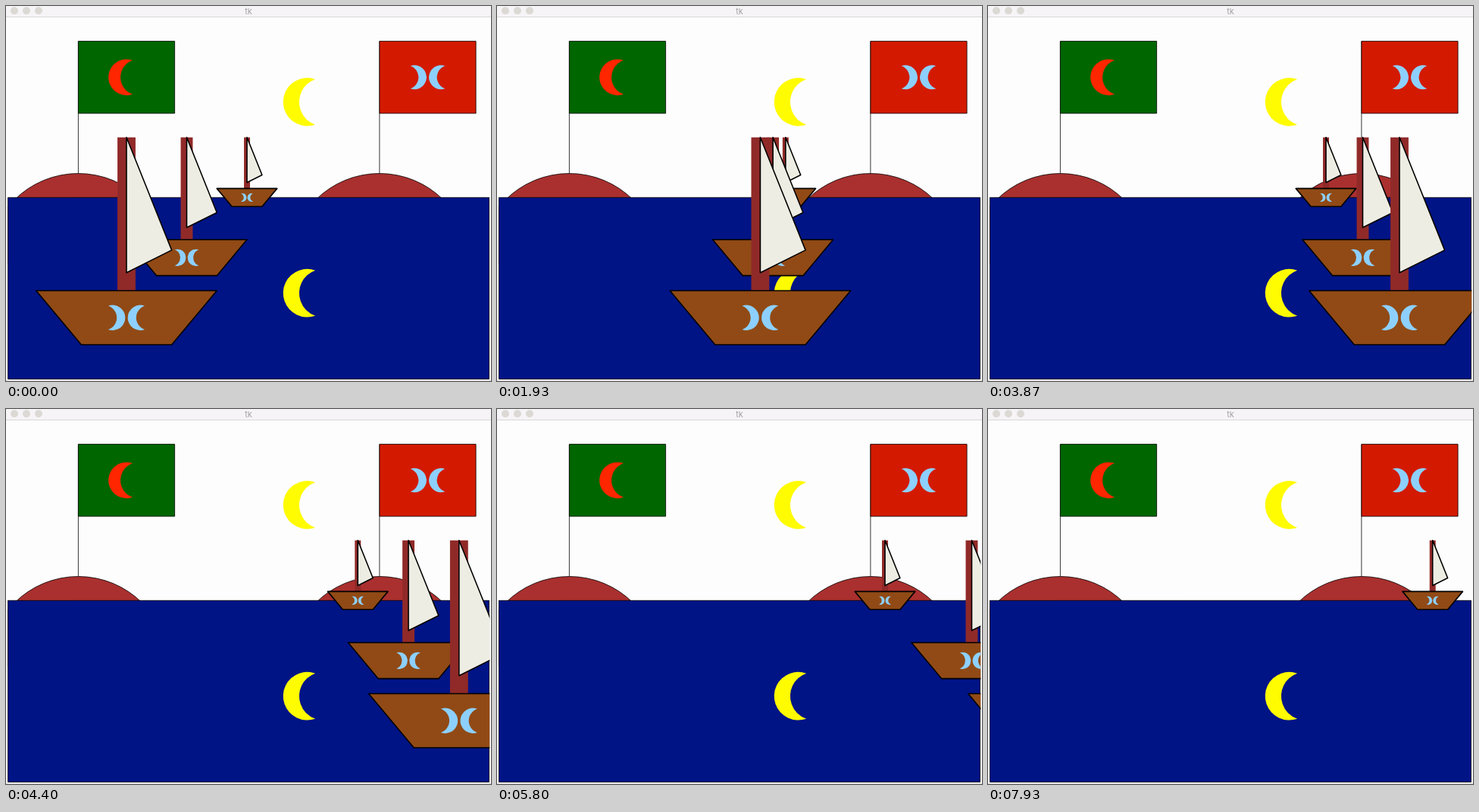
Recreate the animation shown at these times as an HTML page with a canvas. Size 640 by 496 pixels, loop 8000 ms.

```html
<!DOCTYPE html>
<html lang="en">
<head>
<meta charset="utf-8">
<title>tk</title>
<style>
  html, body { margin: 0; width: 100%; height: 100%; overflow: hidden; background: #fdfdfd; }
  canvas { display: block; }
</style>
</head>
<body>
<canvas id="stage" width="640" height="496"></canvas>
<script>
const ctx = document.getElementById('stage').getContext('2d');
const SCALE = 0.795, TOP = 14.8, LOOP = 8000, FPS = 15;
const HORIZON = 300, MAST_TOP = 200;

// [tick, boat steps]: the boats gain a little speed over time
const pace = [[0, 0], [16, 42], [43, 119], [58, 161], [75, 210], [87, 244], [119, 338]];

function stepsAt(tick) {
  const i = Math.max(1, pace.findIndex(([t]) => t >= tick));
  const [t0, s0] = pace[i - 1], [t1, s1] = pace[i];
  return Math.round(s0 + (s1 - s0) * (tick - t0) / (t1 - t0));
}

function paint(fill, lineWidth) {
  ctx.fillStyle = fill;
  ctx.fill();
  if (lineWidth) {
    ctx.lineWidth = lineWidth;
    ctx.strokeStyle = '#000';
    ctx.stroke();
  }
}

function polygon(points, fill, lineWidth) {
  ctx.beginPath();
  points.forEach(([x, y]) => ctx.lineTo(x, y));
  ctx.closePath();
  paint(fill, lineWidth);
}

function box(x, y, w, h, fill, lineWidth) {
  ctx.beginPath();
  ctx.rect(x, y, w, h);
  paint(fill, lineWidth);
}

// A disc minus an equal disc shifted by 2/3 radius; side 1 opens right, -1 left
function crescent(x, y, r, fill, side = 1) {
  const a = Math.acos(1 / 3);
  ctx.save();
  ctx.translate(x, y);
  ctx.scale(side, 1);
  ctx.beginPath();
  ctx.arc(0, 0, r, a, 2 * Math.PI - a);
  ctx.arc(r * 2 / 3, 0, r, Math.PI + a, Math.PI - a, true);
  ctx.restore();
  paint(fill);
}

function emblem(x, y, r) {
  crescent(x - 1.1 * r, y, r, '#8dd0ff', -1);
  crescent(x + 1.1 * r, y, r, '#8dd0ff');
}

function island(x, flagColor) {
  ctx.beginPath();
  ctx.arc(x, 410, 150, Math.PI, 2 * Math.PI);
  paint('#aa302f', 1);
  ctx.beginPath();
  ctx.moveTo(x, 40);
  ctx.lineTo(x, 260);
  ctx.stroke();
  box(x, 40, 160, 120, flagColor, 1);
}

function boat(size, steps) {
  const x = 500 - 100 * size + size * steps;
  const deck = MAST_TOP + 85 * size, keel = deck + 30 * size;
  box(x - 5 * size, MAST_TOP, 10 * size, 85 * size, '#902a28');
  polygon([[x, MAST_TOP], [x, MAST_TOP + 75 * size],
           [x + 25 * size, MAST_TOP + 62.5 * size]], '#eeede3', 2);
  polygon([[x - 50 * size, deck], [x + 50 * size, deck],
           [x + 25 * size, keel], [x - 25 * size, keel]], '#914a15', 2);
  emblem(x, deck + 15 * size, 7 * size);
}

function drawWindow() {
  ctx.fillStyle = '#fdfdfd';
  ctx.fillRect(0, 0, 640, 496);
  ctx.fillStyle = '#f6f4f6';
  ctx.fillRect(0, 0, 640, 14);
  ctx.fillStyle = '#d9d7d9';
  ctx.fillRect(0, 14, 640, 1);
  ctx.fillRect(0, 495, 640, 1);
  for (const x of [11, 27, 43]) {
    ctx.beginPath();
    ctx.arc(x, 6.3, 5, 0, 2 * Math.PI);
    paint('#dcd9d5');
  }
  ctx.fillStyle = '#a3a1a3';
  ctx.font = '11px Inter, sans-serif';
  ctx.textAlign = 'center';
  ctx.fillText('tk', 320, 10.5);
}

function drawScene(steps) {
  ctx.save();
  ctx.beginPath();
  ctx.rect(2, 15, 636.3, 479);
  ctx.clip();
  ctx.translate(0, TOP);
  ctx.scale(SCALE, SCALE);
  ctx.lineJoin = 'round';

  island(120, '#006600');
  crescent(200, 100, 30, '#ff2600');
  island(620, '#d31a00');
  emblem(700, 100, 20);
  box(3, HORIZON, 799, 302, '#001486', 1);
  crescent(500, 141, 40, '#fffb00');
  crescent(500, 459, 40, '#fffb00');
  for (const size of [1, 2, 3]) boat(size, steps);
  ctx.restore();
}

function frame(now) {
  // Half a tick of 10 ms covers the rounding of tick times
  const tick = Math.min(119, Math.floor((now % LOOP + 5) * FPS / 1000));
  drawWindow();
  drawScene(stepsAt(tick));
  requestAnimationFrame(frame);
}
frame(0);
</script>
</body>
</html>
```
